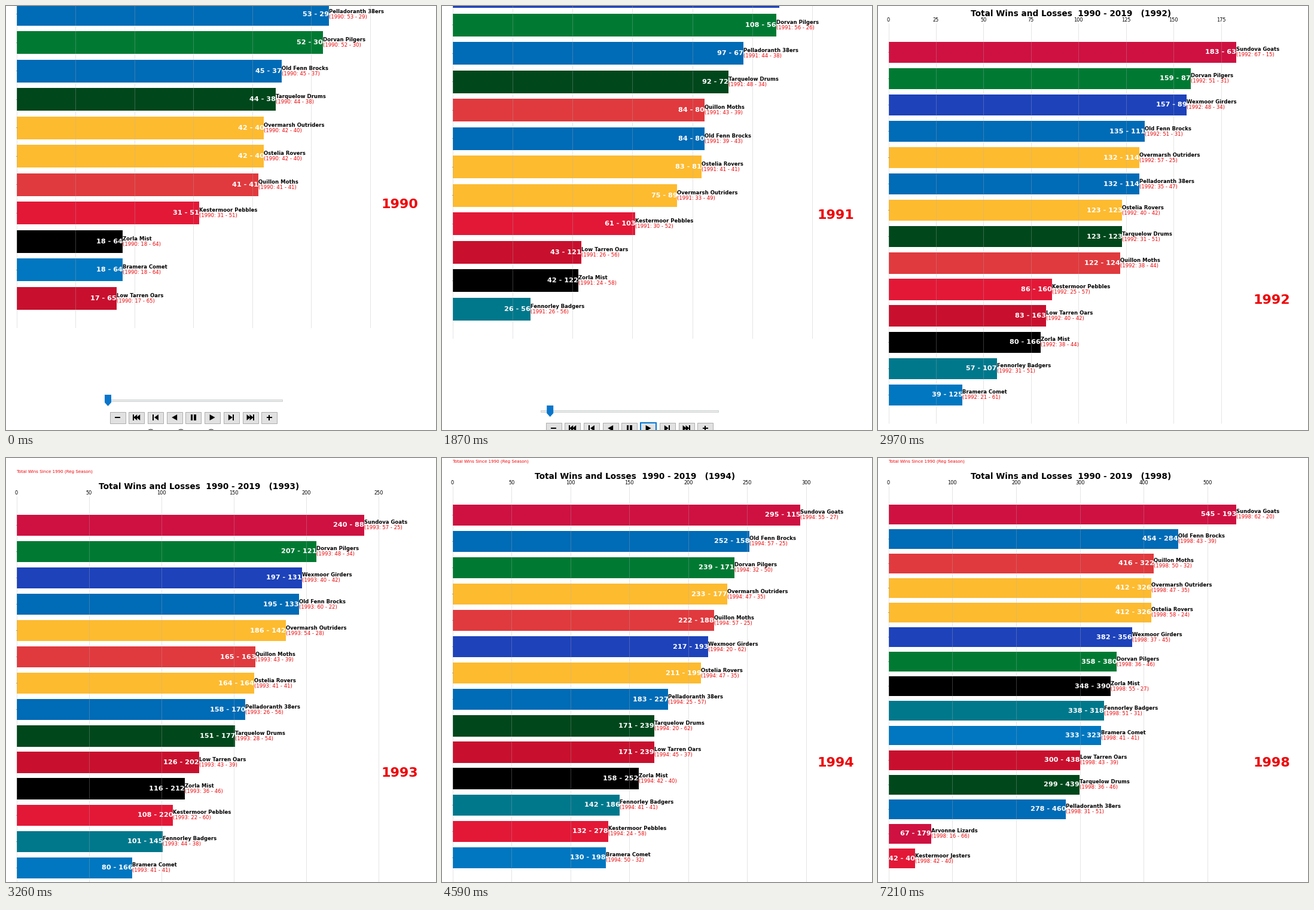
Animation of 719x709 px, one loop 7990 ms. Source, as a matplotlib script:

```python
import matplotlib.pyplot as plt
from matplotlib.animation import FuncAnimation
from matplotlib.patches import Circle, Polygon, Rectangle

W, H, DPI = 719, 709, 100
STEP, FRAMES = 34, 235                 # 7990 ms per loop
FIRST = 1990
LEFT, SPAN = 17.5, 581.5               # x of zero, length of the longest bar
TOP, BOTTOM = 17.2, 686.4              # plot area, page coordinates
RED = "#ee0508"
BLUE = "#0078d7"

# name, colour, first season, wins per season (0 = not listed)
TEAMS = [
    ("Quillon Moths", "#e03a3e", 1990, [41, 43, 38, 43, 57, 42, 46, 56, 50]),
    ("Dorvan Pilgers", "#007a33", 1990, [52, 56, 51, 48, 32, 35, 33, 15, 36]),
    ("Fennorley Badgers", "#00788c", 1991, [26, 31, 44, 41, 50, 41, 54, 51]),
    ("Sundova Goats", "#ce1141", 1990, [55, 61, 67, 57, 55, 47, 72, 69, 62]),
    ("Overmarsh Outriders", "#fdbb30", 1990, [42, 33, 57, 54, 47, 43, 47, 42, 47]),
    ("Wexmoor Girders", "#1d42ba", 1990, [59, 50, 48, 40, 20, 28, 46, 54, 37]),
    ("Ostelia Rovers", "#fdbb30", 1990, [42, 41, 40, 41, 47, 52, 52, 39, 58]),
    ("Zorla Mist", "#000000", 1990, [18, 24, 38, 36, 42, 32, 42, 61, 55]),
    ("Tarquelow Drums", "#00471b", 1990, [44, 48, 31, 28, 20, 34, 25, 33, 36]),
    ("Low Tarren Oars", "#c8102e", 1990, [17, 26, 40, 43, 45, 30, 30, 26, 43]),
    ("Old Fenn Brocks", "#006bb6", 1990, [45, 39, 51, 60, 57, 55, 47, 57, 43]),
    ("Bramera Comet", "#0077c0", 1990, [18, 0, 21, 41, 50, 57, 60, 45, 41]),
    ("Pelladoranth 38ers", "#006bb6", 1990, [53, 44, 35, 26, 25, 24, 18, 22, 31]),
    ("Arvonne Lizards", "#ce1141", 1996, [21, 30, 16]),
    ("Kestermoor Pebbles", "#e31837", 1990, [31, 30, 25, 22, 24, 21, 39, 44]),
    ("Kestermoor Jesters", "#e31837", 1998, [42]),
]

# (start ms, value) schedules
YEARS = [(0, 1990), (1690, 1991), (2480, 1992), (3250, 1993), (4030, 1994),
         (4810, 1995), (5670, 1996), (6450, 1997), (7210, 1998)]
SCROLL = [(0, -148), (1870, -130), (1950, -55), (2020, 50), (2100, 115),
          (2480, 119), (2800, 95), (2880, 40), (2970, 12), (3180, 22),
          (3250, 47), (3340, 65), (4500, 46), (4590, 30)]
AWAY = (-60, -60)
POINTER = [(0, AWAY), (230, (379, 698)), (305, (368, 688)), (380, (355, 678)),
           (455, (346, 674)), (530, (344, 686)), (700, (362, 680)),
           (777, (470, 662)), (853, (682, 645)), (930, AWAY)]
ARROW = [(0, 0), (0, 16), (4, 12.5), (6.5, 18.5), (9, 17.4), (6.5, 11.6), (11.5, 11.6)]


def at(schedule, t):
    return [value for start, value in schedule if start <= t][-1]


fig = plt.figure(figsize=(W / DPI, H / DPI), dpi=DPI, facecolor="white")
ax = fig.add_axes([0, 0, 1, 1])
ax.axis("off")
ax.set_xlim(0, W)


def text(x, y, s, px, color="black", bold=False, ha="left", va="baseline"):
    return ax.text(x, y, s, fontsize=px * 72 / DPI, color=color, ha=ha, va=va,
                   family="DejaVu Sans", weight="bold" if bold else "normal", zorder=4)


def rect(x, y, w, h, color, z=1, **kw):
    return ax.add_patch(Rectangle((x, y), w, h, fc=color, zorder=z, **kw))


def poly(points, color, z=3, **kw):
    return ax.add_patch(Polygon(points, closed=True, fc=color, zorder=z, **kw))


def standings(year):
    rows = []
    for name, color, first, wins in TEAMS:
        k = year - first
        if 0 <= k < len(wins) and wins[k]:
            past = [w for w in wins[:k + 1] if w]
            rows.append((name, color, sum(past), 82 * len(past) - sum(past), wins[k]))
    return sorted(rows, key=lambda r: -r[2])


def chart(year):
    rows = standings(year)
    n, best = len(rows), rows[0][2]
    unit = (BOTTOM - TOP) / ((n - 0.2) * 1.1)
    scale = SPAN / best
    parts = []
    for i, (name, color, won, lost, season) in enumerate(rows):
        y = TOP + (0.4 + 0.05 * (n - 0.2) + i) * unit
        x = LEFT + won * scale
        parts += [
            rect(LEFT, y - 0.4 * unit, won * scale, 0.8 * unit, color, lw=0),
            rect(17, y - 0.4, 1.6, 0.8, "#00000055", 2, lw=0),
            text(x, y, f"{won} - {lost}", 11.2, "white", True, "right", "center"),
            text(x, y, name, 8.5, bold=True, va="bottom"),
            text(x, y, f"({year}: {season} - {82 - season})", 8.55, RED, va="top"),
        ]
    limit = best * 1.05
    gap = next(s for s in (10, 20, 25, 50, 100) if s >= limit / 9)
    ticks = range(0, int(limit) + 1, gap)
    parts.append(ax.vlines([LEFT + v * scale for v in ticks], TOP, BOTTOM,
                           colors="#b0b0b0", alpha=0.32, lw=0.72, zorder=2))
    parts += [text(LEFT + v * scale, 13.9, str(v), 8.2, ha="center") for v in ticks]
    parts.append(text(322.75, 4.8, f"Total Wins and Losses  1990 - 2019   ({year})",
                      13.65, bold=True, ha="center"))
    parts.append(text(627.5, 486, str(year), 22.3, RED, True))
    return parts


def triangle(cx, cy, side, w=7):
    poly([(cx - side * w / 2, cy - 5), (cx - side * w / 2, cy + 5), (cx + side * w / 2, cy)],
         "black", lw=0)


def block(cx, cy, w, h=10):
    rect(cx - w / 2, cy - h / 2, w, h, "black", 3, lw=0)


def icon(kind, cx, cy):
    if kind in (0, 8):
        block(cx, cy, 9, 2.2)
        if kind == 8:
            block(cx, cy, 2.2, 9)
    elif kind == 4:
        block(cx - 2.7, cy, 3.6)
        block(cx + 2.7, cy, 3.6)
    else:
        side = 1 if kind > 4 else -1
        rank = abs(kind - 4)
        if rank == 1:
            triangle(cx, cy, side, 9)
        elif rank == 2:
            triangle(cx - side * 1.5, cy, side)
            block(cx + side * 3.5, cy, 2)
        else:
            triangle(cx - side * 3, cy, side, 6)
            triangle(cx + side * 2, cy, side, 6)
            block(cx + side * 5.5, cy, 1.6)


# horizontal scroll bar at the top of the page
rect(0, -200, W, 89, "#f7f7f7", lw=0)
rect(0, -111, W, 16, "#f0f0f0", lw=0)
rect(0, -111, 622, 15, "#cdcdcd", 2, lw=0)
rect(0, -95.4, W, 1, "#cfcfcf", 2, lw=0)
ax.plot([710.5, 714.5, 710.5], [-107, -103.5, -100], color="#444444", lw=1.3, zorder=3)

text(17.5, -22.7, "Total Wins Since 1990 (Reg Season)", 7.2, RED)

# player controls
rect(165, 805.5, 297, 3, "#e7eaea", ec="#d2d2d2", lw=0.7)
thumb = poly([(0, 0)] * 3, "#0876cc", lw=0)
buttons = []
for k in range(9):
    bx = 173.5 + 31.72 * k
    buttons.append(rect(bx, 826.5, 26, 19, "#e1e1e1", 2, ec="#adadad", lw=0.72))
    icon(k, bx + 13, 836)
play = buttons[5]
for cx in (242, 292.5, 343):
    ax.add_patch(Circle((cx, 862), 6, fc="white", ec="#333333", lw=0.8))

charts = {year: chart(year) for _, year in YEARS}
pointer = poly(ARROW, "white", 6, ec="black", lw=0.7)


def update(i):
    t = (i + 1) * STEP - 1
    year, top = at(YEARS, t), at(SCROLL, t)
    ax.set_ylim(H - top, -top)
    for y, parts in charts.items():
        for p in parts:
            p.set_visible(y == year)

    # the slider runs ahead of the chart by 150 ms
    x = 165 + 10.2 * (at(YEARS, t + 150) - FIRST)
    thumb.set_xy([(x, 798), (x + 11, 798), (x + 11, 811), (x + 5.5, 817), (x, 811)])

    play.set_facecolor("#e5f1fb" if 380 <= t < 777 else "#e1e1e1")
    play.set_edgecolor(BLUE if t >= 380 else "#adadad")
    play.set_linewidth(1.44 if t >= 530 else 0.72)

    px, py = at(POINTER, t)
    pointer.set_xy([(px + dx, py - top + dy) for dx, dy in ARROW])
    pointer.set_visible((px, py) != AWAY)
    return []


anim = FuncAnimation(fig, update, frames=FRAMES, interval=STEP, repeat=True, blit=False)
plt.show()
```
